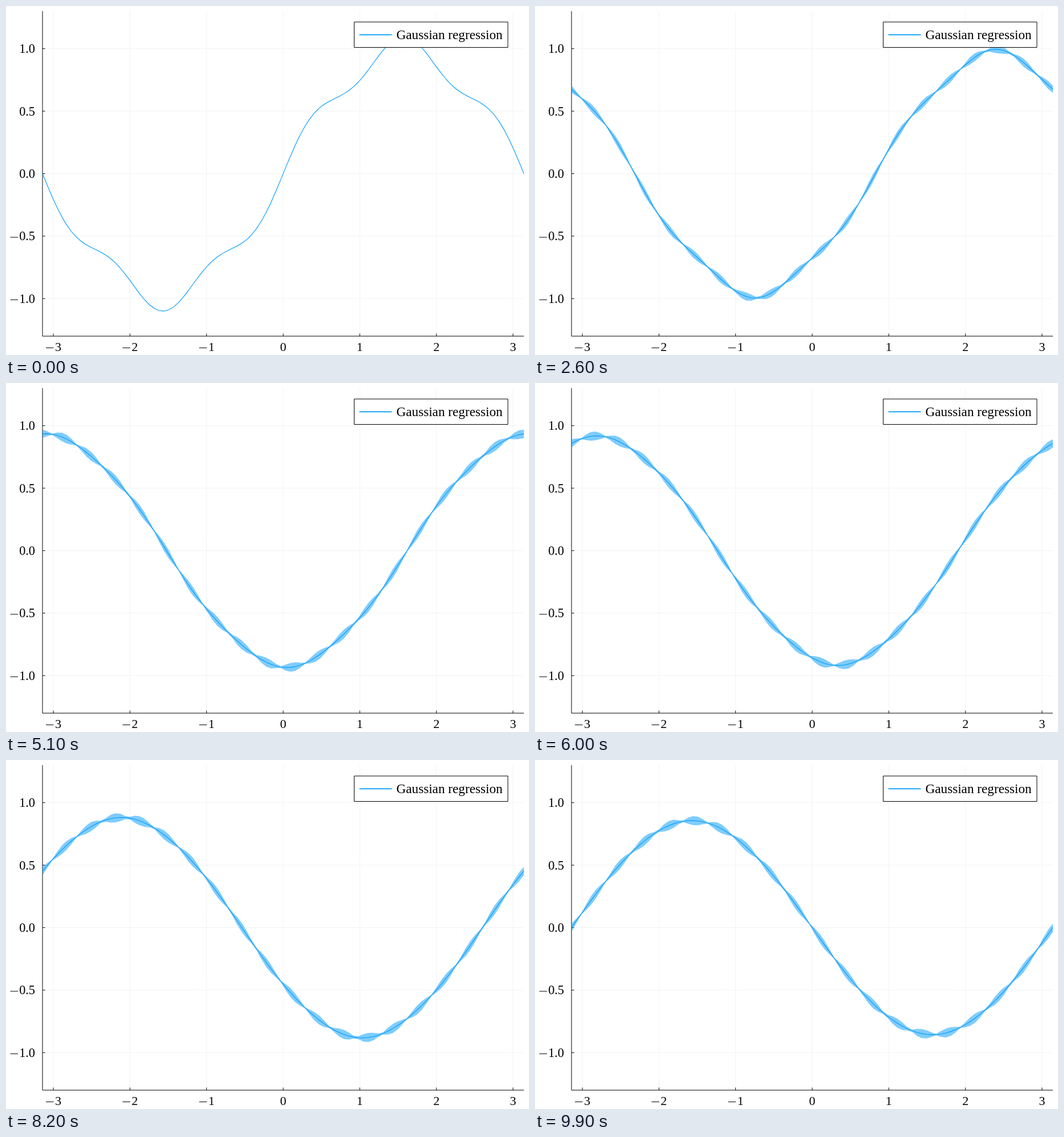
An HTML page with a canvas for the animation above (10000 ms loop, 917x611 px).

```html
<!DOCTYPE html>
<html lang="en">
<head>
<meta charset="utf-8">
<title>Gaussian regression</title>
<style>
  html, body { margin: 0; width: 100%; height: 100%; overflow: hidden; background: #fff; }
  canvas { display: block; }
</style>
</head>
<body>
<canvas id="stage" width="917" height="611"></canvas>
<script>
const ctx = document.getElementById('stage').getContext('2d');
const BLUE = '#009af9';
const SERIF = '"Liberation Serif", "Times New Roman", serif';
const LEFT = 64, RIGHT = 908, TOP = 9, BOTTOM = 578;
const STEPS = 100, STEP_MS = 100, POINTS = 100;
const NODES = 19, NODE_X = -3.02;

const px = x => 486 + x * 422 / Math.PI;
const py = y => 293.5 - y * 218.8;

// Advection and diffusion of sin(x) + 0.1 sin(5x)
function mean(x, t) {
  const s = x - t;
  return Math.exp(-0.05 * t) * Math.sin(s) + 0.1 * Math.exp(-1.25 * t) * Math.sin(5 * s);
}

// Uncertainty pinches at evenly spaced nodes and saturates in time
function spread(x, t) {
  const s = Math.sin(NODES / 2 * (x - NODE_X));
  return 0.0365 * (1 - Math.exp(-t / 0.39)) * Math.sqrt(s * s + 0.015);
}

function line(x1, y1, x2, y2, color, width) {
  ctx.strokeStyle = color;
  ctx.lineWidth = width;
  ctx.beginPath();
  ctx.moveTo(x1, y1);
  ctx.lineTo(x2, y2);
  ctx.stroke();
}

function label(text, x, y, size) {
  ctx.font = size + 'px ' + SERIF;
  ctx.fillStyle = '#000';
  ctx.fillText(text, x, y);
}

// Wide mathematical minus in front of the digits
function minus(x, y) {
  ctx.fillStyle = '#000';
  ctx.fillRect(x, y - 6, 13.5, 1);
}

function drawAxes() {
  const grid = 'rgba(0,0,0,0.05)';
  for (let v = -3; v <= 3; v++) {
    const x = px(v);
    line(x, TOP, x, BOTTOM, grid, 1);
    line(x, BOTTOM, x, BOTTOM - 4.5, '#000', 1);
    ctx.textAlign = 'center';
    label(String(Math.abs(v)), v < 0 ? x + 8.5 : x, 604, 22);
    if (v < 0) minus(x - 13, 604);
  }
  for (let v = -1; v <= 1; v += 0.5) {
    const y = py(v);
    line(LEFT, y, RIGHT, y, grid, 1);
    line(LEFT, y, LEFT + 4.5, y, '#000', 1);
    ctx.textAlign = 'right';
    label(Math.abs(v).toFixed(1), 51, y + 7.5, 22.3);
    if (v < 0) minus(7.5, y + 7.5);
  }
  line(LEFT, TOP, LEFT, BOTTOM, '#000', 1);
  line(LEFT, BOTTOM, RIGHT, BOTTOM, '#000', 1);
}

function trace(fn, back) {
  for (let i = 0; i < POINTS; i++) {
    const k = back ? POINTS - 1 - i : i;
    const x = Math.PI * (2 * k / (POINTS - 1) - 1);
    ctx.lineTo(px(x), py(fn(x)));
  }
}

function drawCurve(t) {
  if (t > 0) {
    ctx.beginPath();
    trace(x => mean(x, t) + spread(x, t));
    trace(x => mean(x, t) - spread(x, t), true);
    ctx.closePath();
    ctx.fillStyle = 'rgba(0,154,249,0.5)';
    ctx.fill();
  }
  ctx.beginPath();
  trace(x => mean(x, t));
  ctx.strokeStyle = BLUE;
  ctx.lineWidth = 1.1;
  ctx.lineJoin = 'round';
  ctx.stroke();
}

function drawLegend() {
  ctx.fillStyle = '#fff';
  ctx.fillRect(610.5, 28, 269.5, 44.5);
  ctx.strokeStyle = '#000';
  ctx.lineWidth = 1;
  ctx.strokeRect(610.5, 28, 269.5, 44.5);
  line(619.5, 50.3, 676.5, 50.3, BLUE, 1.8);
  ctx.textAlign = 'left';
  label('Gaussian regression', 684.5, 58, 23.2);
}

function frame(now) {
  const step = Math.floor(now / STEP_MS) % STEPS;
  ctx.fillStyle = '#fff';
  ctx.fillRect(0, 0, 917, 611);
  drawAxes();
  drawCurve(Math.PI * step / (STEPS - 1));
  drawLegend();
  requestAnimationFrame(frame);
}
requestAnimationFrame(frame);
</script>
</body>
</html>
```
